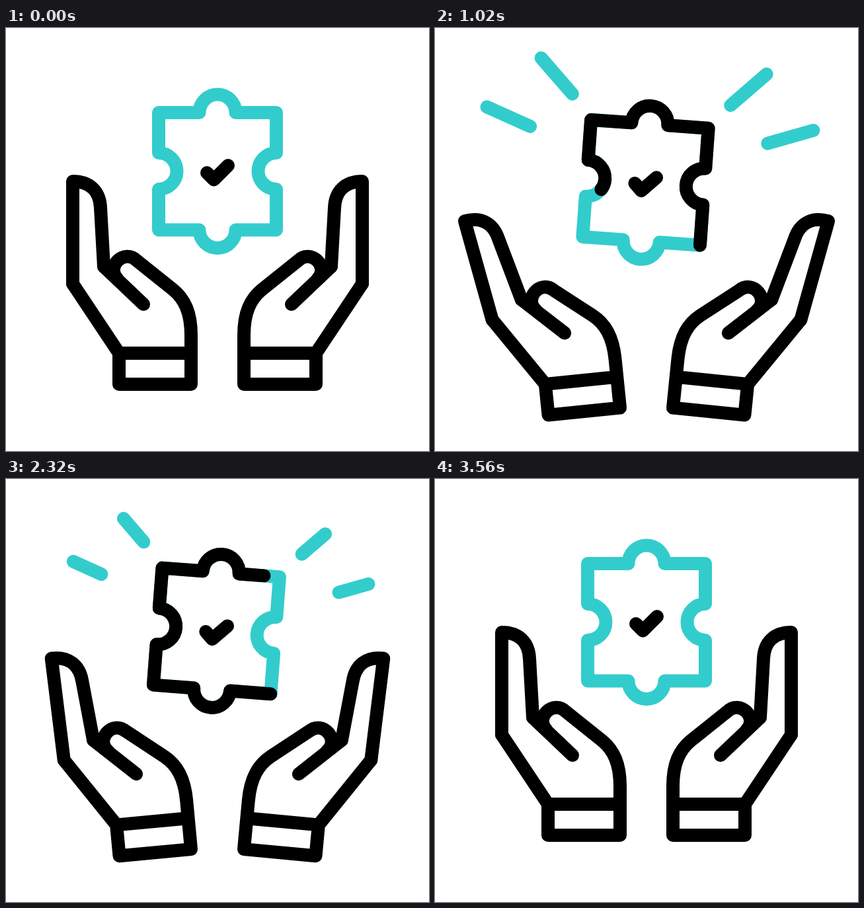
Recreate the animation shown at these times as an HTML page with a canvas. Size 640 by 640 pixels, loop 3.6 s.

```html
<!DOCTYPE html>
<html lang="en">
<head>
<meta charset="utf-8">
<title>Hands and puzzle piece</title>
<style>
  html, body { margin: 0; width: 100%; height: 100%; overflow: hidden; background: #fff; }
  canvas { display: block; }
</style>
</head>
<body>
<canvas id="stage" width="640" height="640"></canvas>
<script>
const ctx = document.getElementById('stage').getContext('2d');
const LOOP = 3600, TEAL = '#33cccc', BLACK = '#000', RAD = Math.PI / 180;

const smooth = u => u * u * (3 - 2 * u);

// Eased value along evenly spaced keys
function track(t, start, step, values) {
  const last = values.length - 1;
  const u = Math.min(last, Math.max(0, (t - start) / step));
  const i = Math.min(last - 1, Math.floor(u));
  return values[i] + (values[i + 1] - values[i]) * smooth(u - i);
}

// Four swings that start and end at zero
const bounce = (t, start, peak, trough) =>
  track(t, start, 400, [0, peak, trough, peak, trough, peak, trough, peak, 0]);

function turnAbout(x, y, degrees) {
  ctx.translate(x, y);
  ctx.rotate(degrees * RAD);
  ctx.translate(-x, -y);
}

const palm = new Path2D('M171 492H280M148 361L208 418' +
  'M169 380C150 361 179 333 198 352L253 396C270 410 280 430 280 465V539H171V492L101 387');

// The fingers turn about the heel of the hand at 101, 387
function drawFingers(degrees) {
  const c = Math.cos(degrees * RAD), s = Math.sin(degrees * RAD);
  const bent = (x, y) => [101 + (x - 101) * c - (y - 387) * s, 387 + (x - 101) * s + (y - 387) * c];
  ctx.beginPath();
  ctx.moveTo(101, 387);
  ctx.lineTo(...bent(101, 232));
  ctx.bezierCurveTo(...bent(127, 232), ...bent(142, 247), ...bent(143, 272));
  ctx.lineTo(148, 361);
  ctx.stroke();
}

function drawHands(t) {
  const slowed = t < 2800 ? t : 2800 + (t - 2800) / 1.2;
  const swing = (peak, trough) => bounce(slowed, 0, peak, trough);
  ctx.strokeStyle = BLACK;
  for (const side of [1, -1]) {
    ctx.save();
    ctx.translate(320, swing(48.5, 18));
    ctx.scale(side, 1);
    ctx.translate(-320, 0);
    turnAbout(280, 539, -swing(6.2, 5.2));
    ctx.stroke(palm);
    drawFingers(-swing(17, 0));
    ctx.restore();
  }
}

// Outline starts at the bottom right corner and runs clockwise
const L = 231, R = 409, T = 128, B = 305.5, CX = 320, CY = 216.5, KNOB = 27.5;
const piece = new Path2D();
piece.moveTo(R, B);
piece.arc(CX, B, KNOB, 0, Math.PI);
piece.lineTo(L, B);
piece.arc(L, CY, KNOB, Math.PI / 2, -Math.PI / 2, true);
piece.lineTo(L, T);
piece.arc(CX, T, KNOB, Math.PI, 2 * Math.PI);
piece.lineTo(R, T);
piece.arc(R, CY, KNOB, -Math.PI / 2, Math.PI / 2, true);
piece.closePath();
const PIECE_LENGTH = 2 * (R - L + B - T) + KNOB * (4 * Math.PI - 8);
const tick = new Path2D('M304 219L314.5 229.5L336 208');

function drawPiece(t) {
  ctx.strokeStyle = TEAL;
  ctx.stroke(piece);
  ctx.strokeStyle = BLACK;
  ctx.stroke(tick);
  const lap = t < 1660 ? t : t - 1600;
  const from = track(lap, 860, 400, [0, PIECE_LENGTH]);
  const to = track(lap, 460, 400, [0, PIECE_LENGTH]);
  if (to - from < .5) return;
  ctx.setLineDash([to - from, 2 * PIECE_LENGTH]);
  ctx.lineDashOffset = -from;
  ctx.stroke(piece);
  ctx.setLineDash([]);
}

function drawRays(t) {
  const end = track(t, 660, 400, [0, 74, 45, 74, 45, 74, 45, 74]);
  const start = track(t, 3060, 400, [0, 74]);
  if (end - start < .05) return;
  ctx.strokeStyle = TEAL;
  ctx.beginPath();
  for (const side of [-1, 1]) {
    for (const [x, y, degrees] of [[180, 144.5, 20], [120, 91, 45]]) {
      const dx = Math.cos(degrees * RAD), dy = Math.sin(degrees * RAD);
      ctx.moveTo(CX + side * (x + start * dx), y - start * dy);
      ctx.lineTo(CX + side * (x + end * dx), y - end * dy);
    }
  }
  ctx.stroke();
}

function draw(t) {
  ctx.clearRect(0, 0, 640, 640);
  ctx.lineWidth = 20;
  ctx.lineCap = ctx.lineJoin = 'round';
  drawHands(t);

  ctx.save();
  ctx.translate(0, bounce(t, 60, 50, -1));
  turnAbout(CX, 196, track(t, 60, 800, [0, 5.2, -5.2, 5.2, 0]));
  drawRays(t);
  drawPiece(t);
  ctx.restore();
}

const begin = performance.now();
function loop() {
  draw((performance.now() - begin) % LOOP);
  requestAnimationFrame(loop);
}
loop();
</script>
</body>
</html>
```
